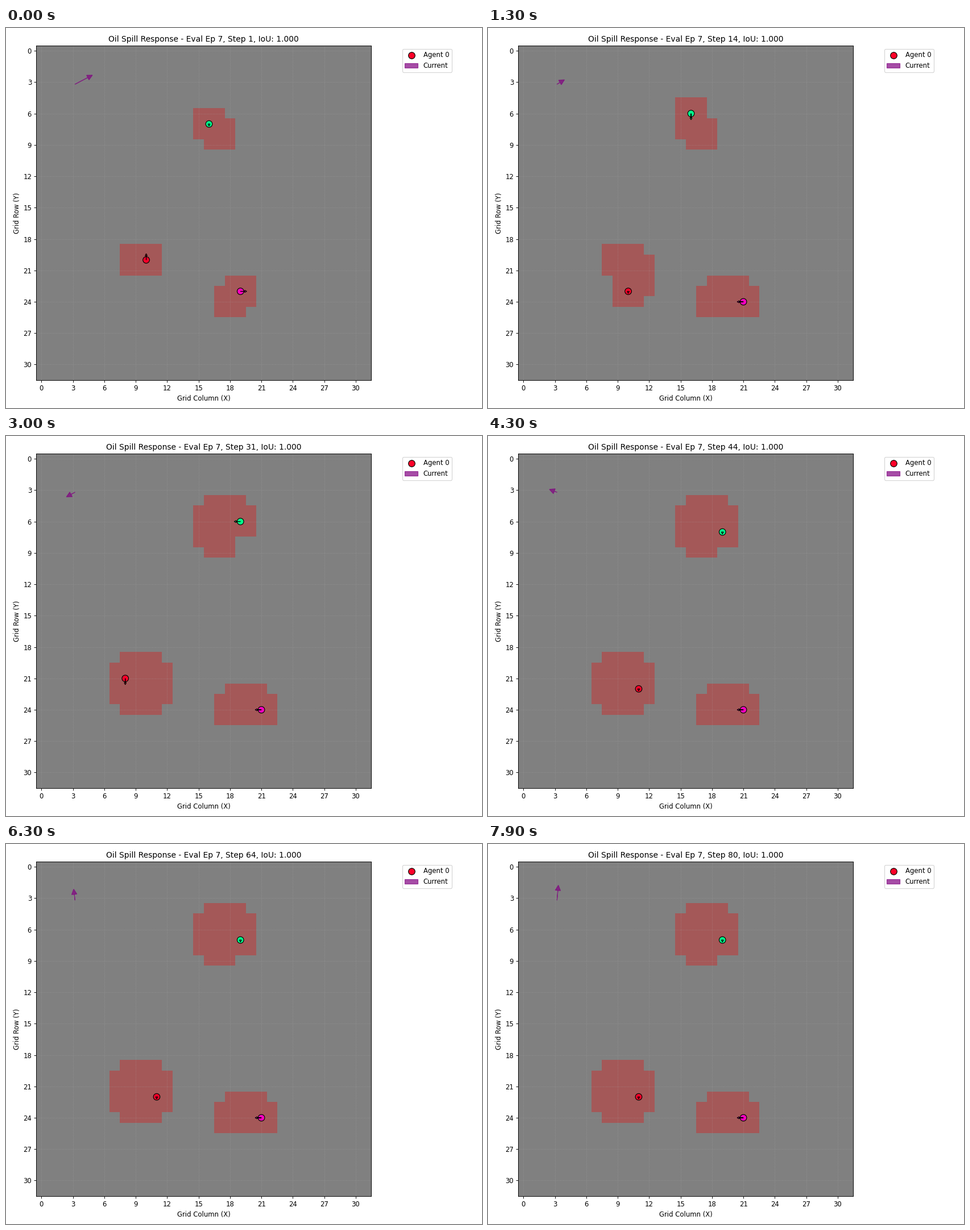
Recreate the animation shown at these times as a matplotlib script. Size 837 by 669 pixels, loop 8000 ms.

```python
import matplotlib.pyplot as plt
import numpy as np
from matplotlib.animation import FuncAnimation
from matplotlib.colors import ListedColormap
from matplotlib.patches import FancyArrow, Patch

W, H, DPI = 837, 669, 83.3
GRID, STEPS = 32, 80
TURN = 27  # step at which the current changes trend

# Spill centre, starting place on its ring, bursts of (first step, moves)
AGENTS = [
    ((9.5, 21.5), 0, [(1, 3), (14, 3), (31, 5)]),
    ((17.5, 6.5), 5, [(1, 2), (29, 4)]),
    ((19.5, 24.5), 7, [(1, 3)]),
]
COLORS = plt.get_cmap("gist_rainbow")(np.linspace(0, 1, len(AGENTS)))


def ring_place(agent, step):
    _, start, bursts = agent
    return start + sum(min(max(step - first + 1, 0), n) for first, n in bursts)


def cell(agent, place):
    """Grid cell on the eight-cell clockwise ring around the spill."""
    (cx, cy), angle = agent[0], np.radians(45 * place - 112.5)
    return round(cx + 1.6 * np.cos(angle)), round(cy + 1.6 * np.sin(angle))


def heading(place):
    """Quarter turns along the upper half of the ring, rest on the lower."""
    quarter = (place + 1) % 8 - 1
    if quarter > 2:
        return 0, 0
    angle = quarter * np.pi / 2
    return .4 * np.cos(angle), -.4 * np.sin(angle)


def explored(step):
    """Cells within one cell of any place visited so far."""
    seen = np.zeros((GRID, GRID))
    for agent in AGENTS:
        for place in range(agent[1], ring_place(agent, step) + 1):
            x, y = cell(agent, place)
            seen[y - 1:y + 2, x - 1:x + 2] = 1
    return seen


def flow(step):
    """Current in cells: reverses up to TURN, then swings upward."""
    start, turn, end = np.array([(1.22, -.64), (-.42, .3), (.085, -.94)])
    if step < TURN:
        p = (step - 1) / (TURN - 1)
        return start + (turn - start) * (1 - (1 - p) ** 1.22, p)
    return turn + (end - turn) * (step - TURN) / (STEPS - TURN)


# The small surplus guards against float truncation of the pixel size
fig = plt.figure(figsize=((W + .01) / DPI, (H + .01) / DPI), dpi=DPI,
                 facecolor="white")
left, bottom, side = 53.2, 620.1, 589.2
ax = fig.add_axes([left / W, (H - bottom) / H, side / W, side / H])
image = ax.imshow(explored(1), cmap=ListedColormap(["#808080", "#a45858"]),
                  vmin=0, vmax=1, interpolation="nearest", aspect="auto")
ax.set(xlim=(-.5, GRID - .5), ylim=(GRID - .5, -.5),
       xticks=range(0, GRID, 3), yticks=range(0, GRID, 3),
       xlabel="Grid Column (X)", ylabel="Grid Row (Y)")
ax.grid(True, linestyle=":", alpha=.4)
title = ax.set_title("")

disc = dict(s=100, edgecolors="black", linewidths=1, zorder=3)
dots = ax.scatter([0] * 3, [0] * 3, c=COLORS, **disc)
pointers = [ax.add_patch(FancyArrow(0, 0, 0, .4, width=.001, head_width=.2,
                                    head_length=.2, fc=c, ec="black",
                                    zorder=4))
            for c in COLORS]
purple = dict(fc="purple", ec="purple", alpha=.7)
current = ax.add_patch(FancyArrow(3.2, 3.2, 1, 0, width=.001, head_width=.5,
                                  head_length=.5, zorder=4, **purple))

sample = ax.scatter([], [], color=COLORS[0], **disc)
ax.legend([sample, Patch(**purple)], ["Agent 0", "Current"],
          loc="upper right", bbox_to_anchor=(1.25, 1))


def update(frame):
    step = frame + 1
    title.set_text(f"Oil Spill Response - Eval Ep 7, Step {step}, IoU: 1.000")
    image.set_data(explored(step))
    places = [ring_place(agent, step) for agent in AGENTS]
    cells = [cell(*pair) for pair in zip(AGENTS, places)]
    dots.set_offsets(cells)
    for pointer, place, (x, y) in zip(pointers, places, cells):
        dx, dy = heading(place)
        pointer.set_data(x=x, y=y, dx=dx, dy=dy)
    dx, dy = flow(step)
    current.set_data(dx=dx, dy=dy)
    return [image, title, dots, current, *pointers]


anim = FuncAnimation(fig, update, frames=STEPS, interval=100, repeat=True,
                     repeat_delay=0, blit=False)
plt.show()
```
